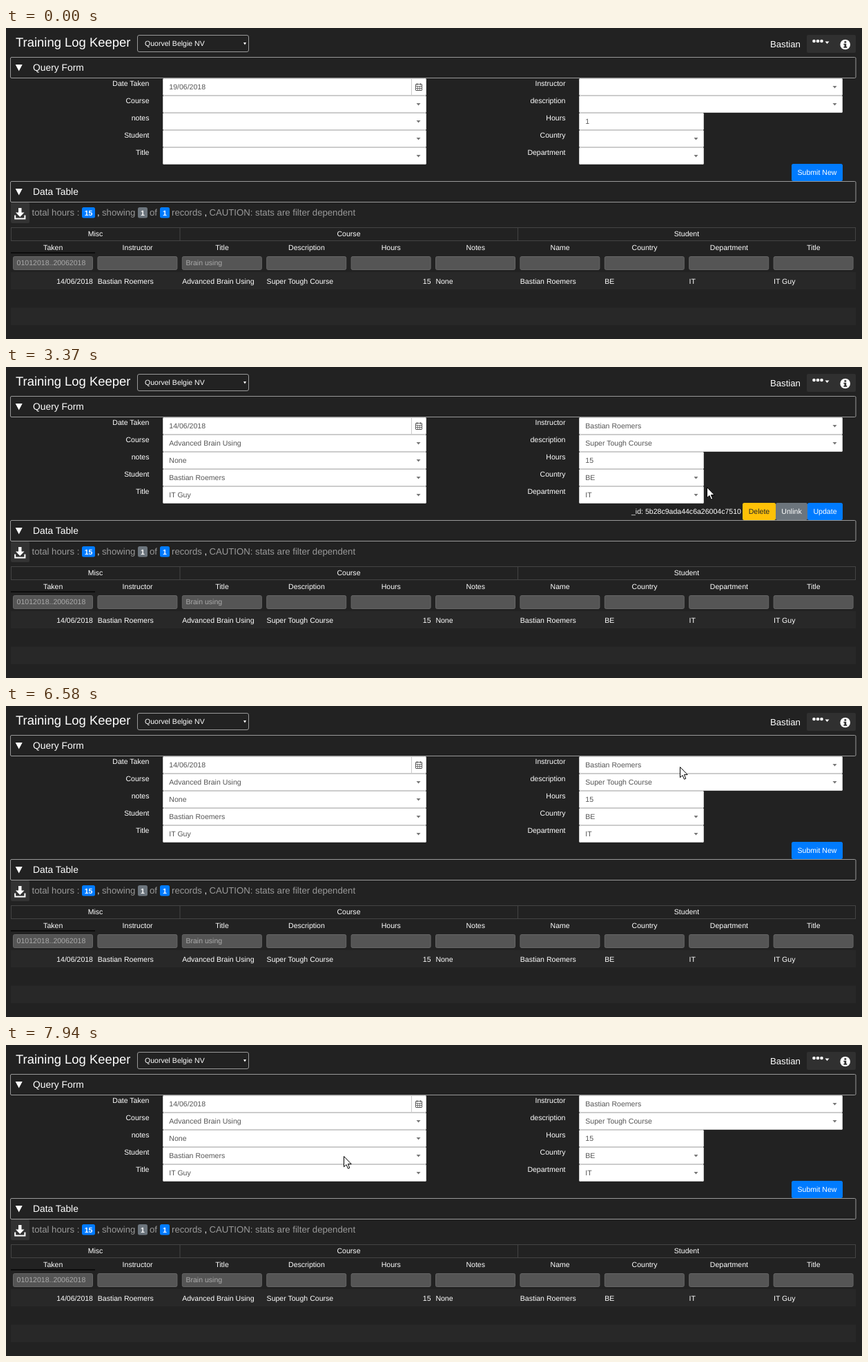
An HTML page that plays this animation: 1240x451 px, repeating every 8000 ms.

```html
<!DOCTYPE html>
<html lang="en">
<head>
<meta charset="utf-8">
<title>Training Log Keeper</title>
<style>
  html, body { margin: 0; width: 100%; height: 100%; overflow: hidden; background: #222; }
  svg { display: block; width: 1240px; height: 451px; }
  text { font: 10.55px "Liberation Sans", Arial, sans-serif; fill: #fff; text-rendering: geometricPrecision; white-space: pre; }
  .title { font-size: 18.46px; }
  .head { font-size: 13.84px; }
  .stat { font-size: 13.18px; }
  .dim { fill: #999; }
  .value { fill: #555; }
  .hint { fill: #aaa; }
  .dark { fill: #212529; }
  .bold { font-weight: bold; }
  .mid { text-anchor: middle; }
  .end { text-anchor: end; }
  .line { fill: none; stroke: #999; }
  .grid { fill: none; stroke: #444; }
  .edge { fill: none; stroke: #ccc; }
  .icon { fill: none; stroke: #555; }
</style>
</head>
<body>
<svg id="stage" viewBox="0 0 1240 451"></svg>
<script>
const BLUE = '#007bff', GREY = '#6c757d';
const LOOP = 8000;
const person = 'Bastian Roemers';

const text = (x, y, s, cls = '') => `<text x="${x}" y="${y}" class="${cls}">${s}</text>`;
const rect = (x, y, w, h, fill, r = 0, more = '') =>
  `<rect x="${x}" y="${y}" width="${w}" height="${h}" rx="${r}" fill="${fill}" ${more}/>`;
const outline = (x, y, w, h, cls, r = 0) =>
  `<rect x="${x}" y="${y}" width="${w}" height="${h}" rx="${r}" class="${cls}"/>`;
const path = (d, more) => `<path d="${d}" ${more}/>`;
const caret = (x, y, fill = '#777', w = 6, h = 3.4) =>
  path(`M${x - w / 2} ${y}h${w}l${-w / 2} ${h}z`, `fill="${fill}"`);
const group = (id, body) => `<g id="${id}">${body}</g>`;
const button = (x, w, label, fill, cls = '', id = '') =>
  rect(x, 197, w, 25, fill, 2.5, id && `id="${id}"`) + text(x + w / 2, 213, label, 'mid ' + cls);

function topBar() {
  return text(14, 27, 'Training Log Keeper', 'title') +
    outline(190.5, 10.5, 161, 24, 'line', 2.5) +
    text(201, 26, 'Quorvel Belgie NV') + caret(346, 21, '#fff', 4, 3.5) +
    text(1107, 27.5, 'Bastian', 'stat') +
    rect(1160, 10, 71, 26, '#303030', 2) +
    [1170.5, 1176, 1181.5].map(x => `<circle cx="${x}" cy="19" r="2.3" fill="#fff"/>`).join('') +
    caret(1189.5, 19.5, '#fff') +
    '<circle cx="1215.7" cy="24" r="7.3" fill="#fff"/>' +
    rect(1214.4, 19.2, 2.8, 2.4, '#303030') +
    path('M1213.4 22.8h3.8v4.3h1.1v1.6h-4.9v-1.6h1.1v-2.7h-1.1z', 'fill="#303030"');
}

function panel(y, label) {
  return outline(6.5, y + .5, 1224.5, 30, 'line', 1.5) +
    caret(18.7, y + 11, '#fff', 10, 9.5) + text(39, y + 20.3, label, 'head');
}

// Each field: label, row, width, first value, picked value, has a dropdown
const left = [
  ['Date Taken', 0, 381, '19/06/2018', '14/06/2018', false],
  ['Course', 1, 381, '', 'Advanced Brain Using', true],
  ['notes', 2, 381, '', 'None', true],
  ['Student', 3, 381, '', person, true],
  ['Title', 4, 381, '', 'IT Guy', true]
];
const right = [
  ['Instructor', 0, 381, '', person, true],
  ['description', 1, 381, '', 'Super Tough Course', true],
  ['Hours', 2, 180, '1', '15', false],
  ['Country', 3, 180, '', 'BE', true],
  ['Department', 4, 180, '', 'IT', true]
];

const field = x => ([label, row, w, , , list]) => {
  const y = 73 + row * 25;
  return text(x - 19.5, y + 11, label, 'end') + rect(x, y, w + 1, 25, '#fff', 2) +
    outline(x + .5, y + .5, w, 24, 'edge', 2) + (list ? caret(x + w - 10.5, y + 36 - 25) : '');
};
const fieldValue = (x, column) => ([, row, , first, picked]) =>
  text(x + 9.3, 88.6 + row * 25, column ? picked : first, 'value');
const values = column =>
  left.map(fieldValue(227, column)).join('') + right.map(fieldValue(830, column)).join('');

function form() {
  const calendar = outline(593.5, 81.5, 9, 9, 'icon', .5) +
    path('M593.5 84.5h9M593.5 87.5h9M596.5 84v6.5M599.5 84v6.5M595.5 80v3M600.5 80v3', 'class="icon" stroke-width=".8"');
  return left.map(field(227)).join('') + right.map(field(830)).join('') +
    path('M587.5 73.5v24', 'class="edge"') + calendar +
    group('blank', values(0)) + group('filled', values(1)) +
    group('submit', button(1138, 74, 'Submit New', BLUE)) +
    group('edit', text(906, 212.5, '_id: 5b28c9ada44c6a26004c7510') +
      button(1067, 48, 'Delete', '#ffc107', 'dark') +
      button(1115, 46, 'Unlink', GREY, '', 'unlink') +
      button(1161, 51, 'Update', BLUE));
}

function stats() {
  const badge = (x, w, s, fill) => rect(x, 260, w, 15.5, fill, 2.5) + text(x + w / 2, 271.5, s, 'mid bold');
  const y = 271.5;
  return rect(7, 253, 27, 30, '#333', 2) +
    path('M18 261h4.5v6.500h4l-6.250 6.500l-6.250-6.500h4z', 'fill="#fff"') +
    path('M13.200 271.500v5h14.200v-5', 'fill="none" stroke="#fff" stroke-width="2"') +
    text(37.500, y, 'total hours :', 'stat dim') + badge(110, 19, '15', BLUE) + text(132, y, ',', 'stat') +
    text(139, y, 'showing', 'stat dim') + badge(191, 14, '1', GREY) + text(208, y, 'of', 'stat dim') +
    badge(223, 14, '1', BLUE) + text(240, y, 'records', 'stat dim') + text(287.500, y, ',', 'stat') +
    text(294.500, y, 'CAUTION: stats are filter dependent', 'stat dim');
}

function table() {
  const step = 122.4;
  const heads = ['Taken', 'Instructor', 'Title', 'Description', 'Hours', 'Notes', 'Name', 'Country', 'Department', 'Title'];
  const cells = ['14/06/2018', person, 'Advanced Brain Using', 'Super Tough Course', '15', 'None', person, 'BE', 'IT', 'IT Guy'];
  const hints = { 0: '01012018..20062018', 2: 'Brain using' };
  let out = outline(7.5, 289.5, 1223, 19, 'grid') + path('M252 289.500v19M741.500 289.500v19', 'class="grid"') +
    text(129.500, 302.300, 'Misc', 'mid') + text(496.500, 302.300, 'Course', 'mid') + text(986, 302.300, 'Student', 'mid') +
    rect(7, 325, 122, 2, '#0c0c0c') +
    rect(7, 354, 1224, 25, '#282828', 0, 'id="row"') + rect(7, 405.500, 1224, 25.500, '#282828');
  heads.forEach((head, i) => {
    const x = 7 + step * i;
    const number = i === 0 || i === 4;
    out += text(x + 61.200, 322, head, 'mid') +
      rect(x + 3.500, 331.500, 115, 19, '#555', 2, 'stroke="#666"') +
      (hints[i] ? text(x + 8.600, 344.300, hints[i], 'hint') : '') +
      text(x + (number ? 119 : 3.400), 370.500, cells[i], number ? 'end' : '');
  });
  return out;
}

function dropdown() {
  const names = ['Udo Haverstraten', 'Udal', 'Steven Dewilder', 'V4 Toolbarn', 'DORV Sales Proficiency', 'Pieter Aelmans', person];
  const items = names.map((name, i) => text(839.300, 129.800 + i * 20, name, i < 6 ? 'value' : '')).join('');
  return rect(830.500, 97.500, 381, 159, '#fff', 1, 'stroke="#aaa"') +
    outline(833.500, 99.500, 374, 23, 'edge', 1.500) + rect(842, 106, 1, 10, '#555') +
    '<circle cx="1196" cy="110.500" r="3.300" class="icon" style="stroke:#888;stroke-width:1.400"/>' +
    path('M1198.500 113l3 3', 'stroke="#888" stroke-width="1.800"') +
    rect(831, 236.500, 369, 19.800, '#337ab7') +
    `<g clip-path="url(#list)">${items}</g>` +
    rect(1200, 125, 11, 131, '#f1f1f1') + rect(1201, 185, 9, 15, '#c1c1c1') +
    path('M1203 133h5l-2.500-3z', 'fill="#505050"') + caret(1205.500, 249, '#505050', 5, 3);
}

const arrow = path('M.500.500V15.700L4 12.500L6.500 18.200L8.800 17.200L6.400 11.600H11.200Z', 'fill="#fff" stroke="#000" stroke-linejoin="round"');
const hand = path('M-1.500 1.500C-1.500-.500 1.500-.500 1.500 1.500V7C2 6 4.300 6.200 4.400 7.700C5 6.700 7 7 7.200 8.500C8 7.700 9.500 8.300 9.500 9.800V14.500L7.800 17.500V20H-1V17.500L-4.500 12C-5.500 10.300-3.300 9-2.300 10.500L-1.500 11.700Z', 'fill="#fff" stroke="#000" stroke-linejoin="round"');

document.getElementById('stage').innerHTML =
  '<clipPath id="list"><rect x="831" y="125" width="369" height="132"/></clipPath>' +
  rect(0, 0, 1240, 451, '#222') + topBar() + panel(42, 'Query Form') + form() +
  panel(222, 'Data Table') + stats() + table() +
  group('focus', rect(830.500, 73.500, 381, 24, 'none', 2, 'stroke="#3b80bd"') + caret(1200.500, 84, '#222')) +
  group('menu', dropdown()) +
  group('pointer', group('arrow', arrow) + group('hand', hand));

// Pointer path: time, x, y
const route = [
  [70, 705, 422], [370, 695, 385], [570, 688, 340], [800, 672, 277], [900, 612, 195], [1000, 548, 117],
  [1200, 528, 110], [1400, 517, 180], [1700, 552, 337], [1800, 560, 362], [1970, 563, 373], [2170, 566, 355],
  [2270, 570, 306], [2570, 835, 60], [2970, 930, 90], [3270, 1045, 165], [3470, 985, 183], [3670, 953, 175],
  [4070, 1030, 150], [4340, 1105, 182], [4470, 1113, 194], [4670, 1122, 202], [5010, 1131, 203], [5290, 1131, 203],
  [5690, 1045, 130], [5890, 1000, 101], [6090, 985, 165], [6180, 982, 182], [6580, 976, 88], [6880, 977, 86],
  [7540, 977, 86], [7740, 760, 62], [7840, 622, 112], [7940, 489, 161], [8000, 489, 161]
];
// The pointer is sampled every 100 ms, counted from these times
const beats = [70, 900, 1870, 5290, 6180, 7040];

function locate(t) {
  const beat = beats.findLast(b => b <= t);
  const at = beat + Math.floor((t - beat) / 100) * 100;
  const i = route.findLastIndex(p => p[0] <= at);
  const [t0, x0, y0] = route[i], [t1, x1, y1] = route[i + 1];
  const k = (at - t0) / (t1 - t0);
  return [x0 + (x1 - x0) * k, y0 + (y1 - y0) * k];
}

const $ = id => document.getElementById(id);
const show = (id, on) => $(id).setAttribute('visibility', on ? 'visible' : 'hidden');
const between = (v, a, b) => v >= a && v < b;

function draw(t) {
  const inside = t >= 70;
  const [x, y] = inside ? locate(t) : [0, 0];
  const picked = t >= 1970;
  const editing = between(t, 1970, 5290);
  const onButton = editing && between(x, 1067, 1212) && between(y, 197, 222);

  show('blank', !picked);
  show('filled', picked);
  show('edit', editing);
  show('submit', !editing);
  show('focus', between(t, 6880, 7840));
  show('menu', between(t, 7040, 7540));
  show('arrow', inside && !onButton);
  show('hand', onButton);
  $('pointer').setAttribute('transform', `translate(${Math.round(x)} ${Math.round(y)})`);
  const hover = between(y, 354, 379) || between(t, 1800, 2370);
  $('row').setAttribute('fill', hover ? '#424242' : '#282828');
  $('unlink').setAttribute('fill', onButton && between(x, 1115, 1161) ? '#5a6268' : GREY);
}

const start = performance.now();
function tick() {
  draw((performance.now() - start) % LOOP);
  requestAnimationFrame(tick);
}
tick();
</script>
</body>
</html>
```
